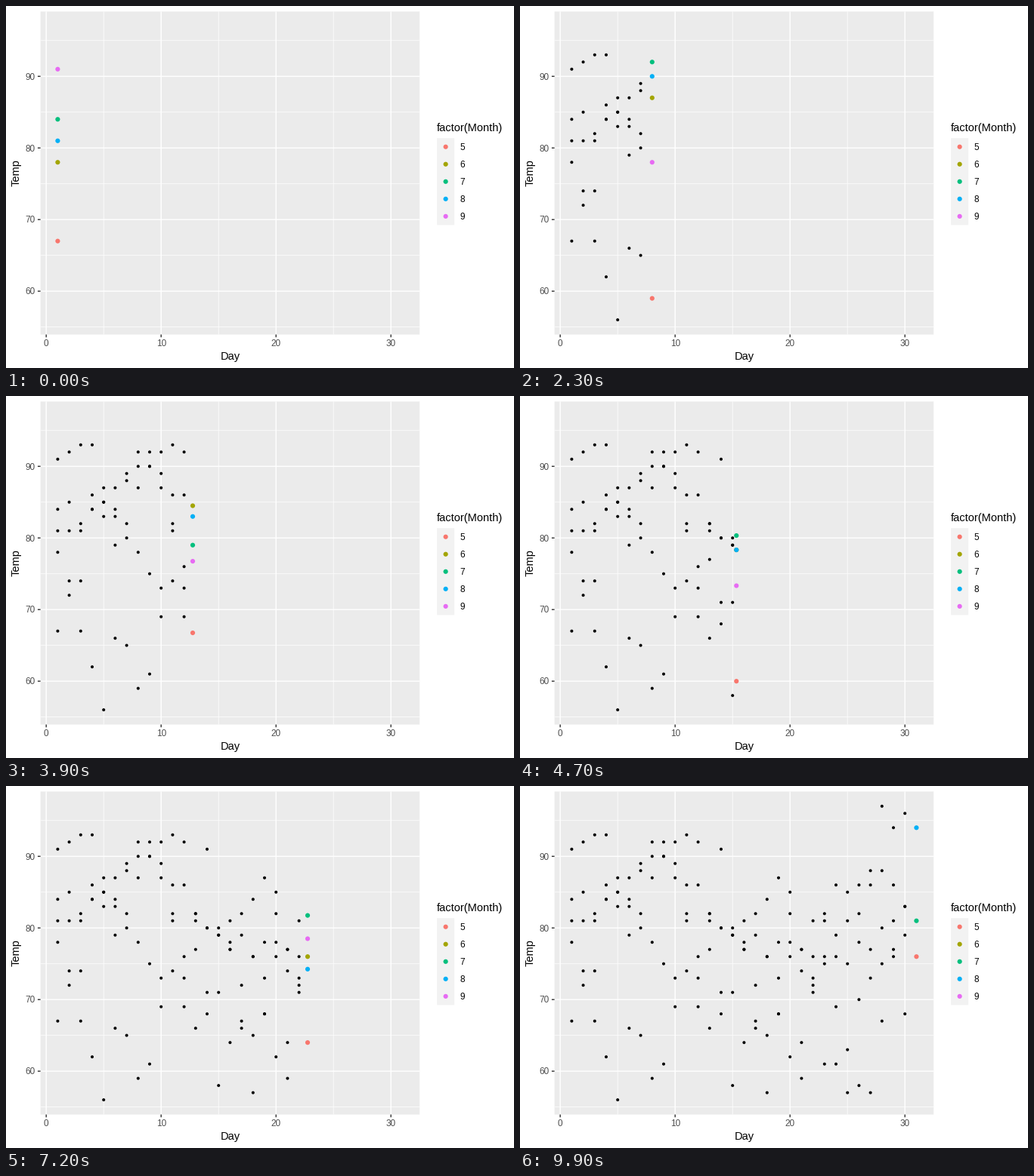
Write a matplotlib script that moves like this. It is 672 px wide and 480 px high and loops after 10 s.

```python
import numpy as np
import matplotlib.pyplot as plt
from matplotlib.animation import FuncAnimation
from matplotlib.patches import Circle, Rectangle

plt.rcParams["font.family"] = "Liberation Sans"

W, H, DPI = 672, 480, 96
FRAMES, DAYS = 100, 31
LEFT, RIGHT, TOP, BOTTOM = 45.6, 547.2, 7.33, 435.6
TITLE, LABEL = 11, 8.8
MAJOR, MINOR = 1.42, 0.71

# Daily temperatures from the airquality data set
may = [67, 72, 74, 62, 56, 66, 65, 59, 61, 69, 74, 69, 66, 68, 58, 64,
       66, 57, 68, 62, 59, 73, 61, 61, 57, 58, 57, 67, 81, 79, 76]
june = [78, 74, 67, 84, 85, 79, 82, 87, 90, 87, 93, 92, 82, 80, 79,
        77, 72, 65, 73, 76, 77, 76, 76, 76, 75, 78, 73, 80, 77, 83]
july = [84, 85, 81, 84, 83, 83, 88, 92, 92, 89, 82, 73, 81, 91, 80, 81,
        82, 84, 87, 85, 74, 81, 82, 86, 85, 82, 86, 88, 86, 83, 81]
august = [81, 81, 82, 86, 85, 87, 89, 90, 90, 92, 86, 86, 82, 80, 79, 77,
          79, 76, 78, 78, 77, 72, 75, 79, 81, 86, 88, 97, 94, 96, 94]
september = [91, 92, 93, 93, 87, 84, 80, 78, 75, 73, 81, 76, 77, 71, 71,
             78, 67, 76, 68, 82, 64, 71, 81, 69, 63, 70, 77, 75, 76, 68]
months = [may, june, july, august, september]
colors = ["#F8766D", "#A3A500", "#00BF7D", "#00B0F6", "#E76BF3"]

days = np.arange(1, DAYS + 1)
# Frame at which each day is reached, rounding halves to even from a start of 1
keys = np.round((FRAMES - 1) * (days - 1) / (DAYS - 1) + 1) - 1

fig = plt.figure(figsize=(W / DPI, H / DPI), dpi=DPI, facecolor="white")
ax = fig.add_axes([0, 0, 1, 1])
ax.set(xlim=(0, W), ylim=(H, 0))
ax.axis("off")


def px(day):
    return LEFT + (day + 0.5) * (RIGHT - LEFT) / 33


def py(temp):
    return TOP + (99.05 - temp) * (BOTTOM - TOP) / 45.1


def rect(x, y, w, h, color):
    ax.add_patch(Rectangle((x, y), w, h, fc=color, lw=0, snap=False, zorder=0))


def line(xs, ys, width, color):
    ax.plot(xs, ys, color=color, lw=width * 72 / DPI, snap=False,
            solid_capstyle="butt", zorder=1)


def disc(x, y, r, color, z):
    return ax.add_patch(Circle((x, y), r, fc=color, lw=0, zorder=z))


def text(x, y, s, size, color="black", ha="center", **kw):
    ax.text(x, y, s, fontsize=size, color=color, ha=ha, va="baseline", **kw)


def vgrid(day, width):
    line([px(day)] * 2, [TOP, BOTTOM], width, "white")


def hgrid(temp, width):
    line([LEFT, RIGHT], [py(temp)] * 2, width, "white")


rect(LEFT, TOP, RIGHT - LEFT, BOTTOM - TOP, "#EBEBEB")
for t in range(55, 100, 10):
    hgrid(t, MINOR)
for d in (5, 15, 25):
    vgrid(d, MINOR)
for t in range(60, 100, 10):
    hgrid(t, MAJOR)
    line([LEFT - 3.67, LEFT], [py(t)] * 2, MAJOR, "#333333")
    text(39, py(t) + 4.3, str(t), LABEL, "#4D4D4D", "right")
for d in range(0, 40, 10):
    vgrid(d, MAJOR)
    line([px(d)] * 2, [BOTTOM, BOTTOM + 3.67], MAJOR, "#333333")
    text(px(d), 451, str(d), LABEL, "#4D4D4D")
text((LEFT + RIGHT) / 2, 469, "Day", TITLE)
text(18, (TOP + BOTTOM) / 2, "Temp", TITLE, rotation=90, rotation_mode="anchor")

KEY_X, KEY_Y, KEY = 570.1, 175.2, 23.04
text(KEY_X, 166, "factor(Month)", TITLE, ha="left")
rect(KEY_X, KEY_Y, KEY, 5 * KEY, "#F2F2F2")
for i, c in enumerate(colors):
    y = KEY_Y + (i + 0.5) * KEY
    disc(KEY_X + KEY / 2, y, 3.08, c, 2)
    text(KEY_X + KEY + 7.33, y + 4.3, str(i + 5), LABEL, ha="left")

marks = [(k, disc(px(d), py(t), 2.01, "black", 2))
         for temps in months for d, k, t in zip(days, keys, temps)]
movers = [disc(0, 0, 3.08, c, 3) for c in colors]


def draw(frame):
    for key, mark in marks:
        mark.set_visible(key < frame)
    x = px(np.interp(frame, keys, days))
    for temps, dot in zip(months, movers):
        reached = keys[:len(temps)]
        dot.center = x, py(np.interp(frame, reached, temps))
        dot.set_visible(frame <= reached[-1])
    return movers


anim = FuncAnimation(fig, draw, frames=FRAMES, interval=100,
                     init_func=lambda: draw(0), repeat=True, repeat_delay=0)
plt.show()
```
